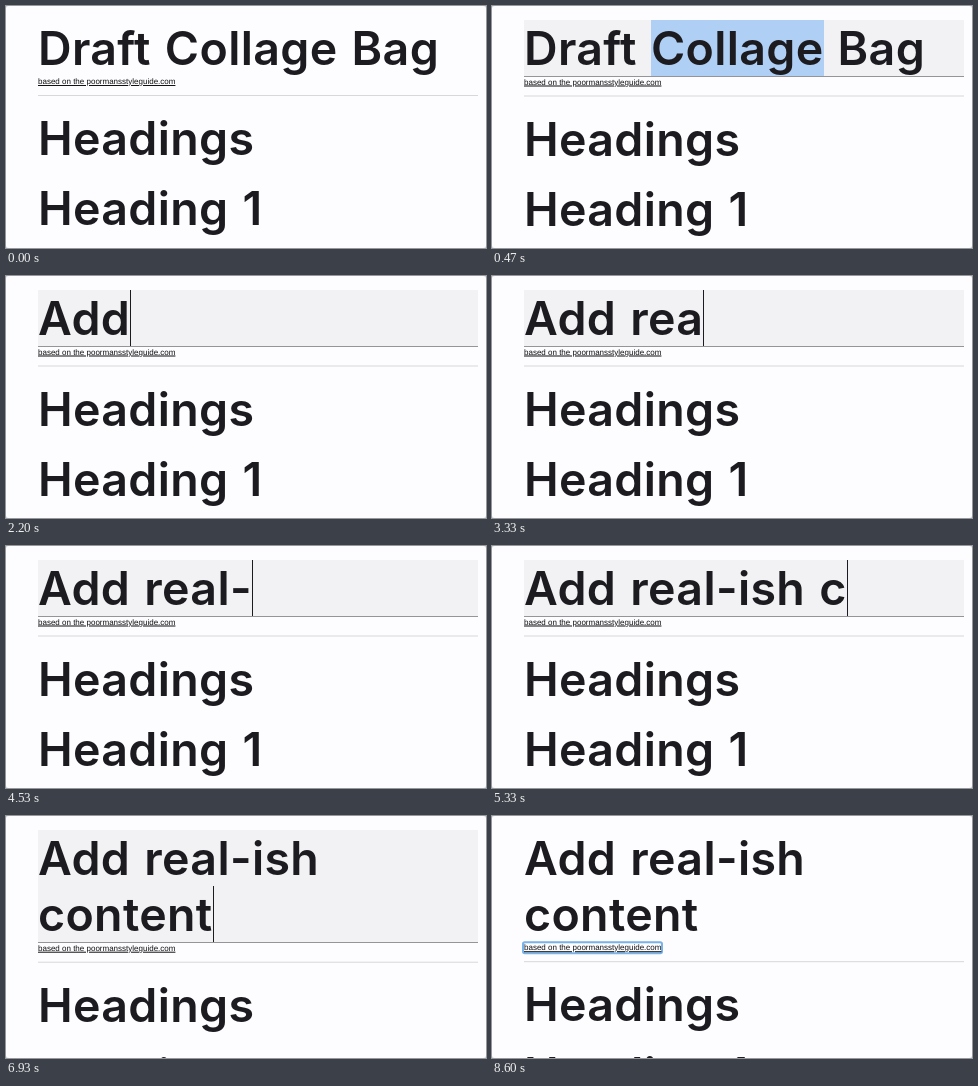
These frames come from a looping animation (480 by 242 pixels, 8740 ms). An HTML page:

```html
<!DOCTYPE html>
<html lang="en">
<head>
<meta charset="utf-8">
<title>Editable headings</title>
<style>
  html, body { margin: 0; width: 100%; height: 100%; overflow: hidden; background: #d4d3d6; }
  #stage {
    position: relative; width: 480px; height: 242px; overflow: hidden;
    background: #fdfcff; color: #1c1b1f; border-radius: 3px;
  }
  #stage > *, #below > * { position: absolute; left: 32px; margin: 0; white-space: pre; }
  h1, h2 {
    font: 600 46.5px/56.2px Inter, sans-serif;
    font-optical-sizing: none; letter-spacing: .35px; word-spacing: 2px;
  }
  #title { top: 14px; width: 440px; border-bottom: 1px solid transparent; }
  #title.focused { background: #f2f1f3; border-color: #959498; }
  #marked { display: inline-block; vertical-align: top; background: #b0cff4; }
  #caret {
    display: inline-block; vertical-align: top; width: 1px; height: 56.2px;
    margin-right: -1px; background: #1c1b1f;
  }
  #stage > #below { left: 0; top: 0; width: 480px; }
  #link {
    top: 71px; font: 8px/9px "Liberation Sans", Arial, sans-serif; color: #111;
    text-rendering: geometricPrecision; text-decoration: underline; border-radius: 1px;
  }
  #link.focused { box-shadow: 0 0 0 2px #79b3e8; }
  #rule { top: 89px; width: 440px; height: 1px; background: #d8d7da; }
</style>
</head>
<body>
<div id="stage">
  <h1 id="title"><span id="before"></span><span id="caret"></span><span id="marked"></span><span id="after"></span></h1>
  <div id="below">
    <span id="link">based on the poormansstyleguide.com</span>
    <div id="rule"></div>
    <h2 style="top:103.5px">Headings</h2>
    <h2 style="top:173.7px">Heading 1</h2>
  </div>
</div>
<script>
const LOOP = 8740, BLINK = 530, LINE = 56.2, BORDER_SHIFT = 0.5;
const CLICK = 270, SELECT_WORD = 470, SELECT_ALL = 600, TYPE = 1800, BLUR = 7600;
const TITLE = 'Draft Collage Bag', WORD = [6, 13], CLICKED = 10;
const MESSAGE = 'Add real-ish content';
const WRAP_AT = 'Add real-ish conten'.length;

// One time per typed character of MESSAGE.
const KEYS = [1800, 2070, 2200, 2330, 3070, 3200, 3330, 3600, 4530, 4730,
              4870, 5000, 5200, 5330, 5470, 5670, 5730, 5730, 5800, 5870];

const [title, before, caret, marked, after, below, link] =
  ['title', 'before', 'caret', 'marked', 'after', 'below', 'link']
    .map(id => document.getElementById(id));

function selectionAt(t) {
  if (t < SELECT_WORD) return [CLICKED, CLICKED];
  return t < SELECT_ALL ? WORD : [0, TITLE.length];
}

function setTitle(text, start, end) {
  before.textContent = text.slice(0, start);
  marked.textContent = text.slice(start, end);
  after.textContent = text.slice(end);
}

function draw(t) {
  const typed = KEYS.filter(time => time <= t).length;
  const focused = t >= CLICK && t < BLUR;
  const wrapped = typed >= WRAP_AT;

  if (typed) {
    let text = MESSAGE.slice(0, typed);
    if (wrapped) text = text.replace('ish ', 'ish\n');
    setTitle(text, text.length, text.length);
  } else {
    setTitle(TITLE, ...selectionAt(t));
  }

  const lastInput = typed ? KEYS[typed - 1] : CLICK;
  const blinkOn = Math.floor((t - lastInput) / BLINK) % 2 === 0;
  const selecting = t >= SELECT_WORD && t < TYPE;
  caret.style.display = focused && blinkOn && !selecting ? '' : 'none';

  title.classList.toggle('focused', focused);
  link.classList.toggle('focused', t >= BLUR);
  const shift = (focused ? BORDER_SHIFT : 0) + (wrapped ? LINE : 0);
  below.style.transform = `translateY(${shift}px)`;
}

function frame() {
  draw(performance.now() % LOOP);
  requestAnimationFrame(frame);
}
frame();
</script>
</body>
</html>
```
